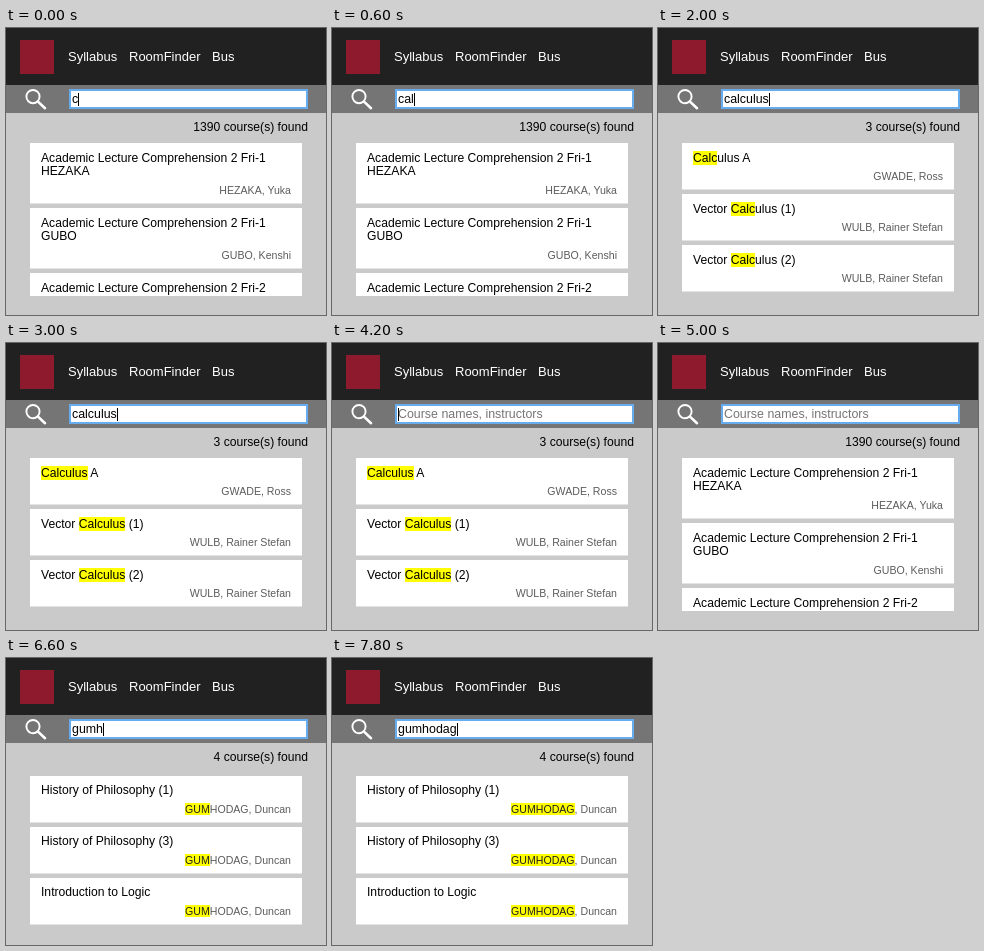
Write an HTML page that moves like this. It is 320x287 px and loops after 8 s.

```html
<!DOCTYPE html>
<html lang="en">
<head>
<meta charset="utf-8">
<title>Course search</title>
<style>
  html, body { margin: 0; width: 100%; height: 100%; overflow: hidden; }
  body { position: relative; max-width: 320px; background: #cacaca; color: #000;
         font: 12.15px/14px "Liberation Sans", Arial, sans-serif; }
  body div, body span, svg { position: absolute; white-space: pre; }
  .top { left: 0; top: 0; width: 320px; height: 57px; background: #212121; }
  .top span { top: 22px; color: #fff; font-size: 13px; }
  .logo { left: 14px; top: 12px; width: 34px; height: 34px; background: #8e1a2e; }
  .bar { left: 0; top: 57px; width: 320px; height: 28px; background: #757575; }
  .field { left: 64px; top: 62px; width: 237px; height: 18px; background: #fff;
           box-shadow: inset 0 0 0 1px #66acef, 0 0 0 1px #66acef; }
  #query { left: 2px; top: 2px; font-size: 12.4px; }
  #query.empty { color: #757575; }
  #caret { top: 3px; width: 1px; height: 13px; background: #000; }
  #count { right: 18px; top: 92px; }
  #list { left: 24px; top: 0; width: 272px; height: 268px; overflow: hidden; }
  .card { left: 0; width: 272px; background: #fff; box-shadow: inset 0 -1px #e4e4e4; }
  .card .title { left: 11px; line-height: 13px; }
  .card .who { right: 11px; color: #5c5c5c; font-size: 10.6px; line-height: 12px; }
  mark { background: #ff0; color: inherit; }
  .who mark { color: #222; }
</style>
</head>
<body>
  <div class="top">
    <div class="logo"></div>
    <span style="left:62px">Syllabus</span>
    <span style="left:123px">RoomFinder</span>
    <span style="left:206px">Bus</span>
  </div>
  <div class="bar"></div>
  <svg style="left:0;top:57px" width="60" height="28" fill="none" stroke="#fff">
    <circle cx="27" cy="11.6" r="6.6" stroke-width="1.9"/>
    <path d="M32 16.6L39 23.2" stroke-width="2.6" stroke-linecap="round"/>
  </svg>
  <div class="field"><span id="query"></span><div id="caret"></div></div>
  <span id="count"></span>
  <div id="list"></div>

<script>
const LOOP = 8000;
const $ = id => document.getElementById(id);
const lecture = 'Academic Lecture Comprehension 2 Fri-';

const results = {
  all: {
    count: 1390, top: 115, height: 61, pad: 9,
    rows: [
      [lecture + '1\nHEZAKA', 'HEZAKA, Yuka'],
      [lecture + '1\nGUBO', 'GUBO, Kenshi'],
      [lecture + '2\nBEZONHALNE', '']
    ]
  },
  calculus: {
    count: 3, top: 115, height: 47, pad: 9,
    rows: [
      ['Calculus A', 'GWADE, Ross'],
      ['Vector Calculus (1)', 'WULB, Rainer Stefan'],
      ['Vector Calculus (2)', 'WULB, Rainer Stefan']
    ]
  },
  teacher: {
    count: 4, top: 118, height: 47, pad: 8,
    rows: ['History of Philosophy (1)', 'History of Philosophy (3)', 'Introduction to Logic']
      .map(title => [title, 'GUMHODAG, Duncan'])
  }
};

// start time, typed text, result set, highlighted term, caret shown
const steps = [
  [0, 'c', 'all', '', 1],
  [200, 'ca', 'all', '', 1],
  [600, 'cal', 'all', '', 1],
  [800, 'calc', 'all', '', 1],
  [1000, 'calc', 'calculus', 'calc', 1],
  [1200, 'calcu', 'calculus', 'calc', 1],
  [1600, 'calcul', 'calculus', 'calc', 1],
  [1800, 'calculu', 'calculus', 'calc', 1],
  [2000, 'calculus', 'calculus', 'calc', 1],
  [2400, 'calculus', 'calculus', 'calculus', 1],
  [2600, 'calculus', 'calculus', 'calculus', 0],
  [3000, 'calculus', 'calculus', 'calculus', 1],
  [3200, 'calculu', 'calculus', 'calculus', 1],
  [3400, 'calcul', 'calculus', 'calculus', 1],
  [3600, 'calc', 'calculus', 'calculus', 1],
  [3800, 'cal', 'calculus', 'calculus', 1],
  [4000, 'c', 'calculus', 'calculus', 1],
  [4200, '', 'calculus', 'calculus', 1],
  [4600, '', 'all', '', 1],
  [5000, '', 'all', '', 0],
  [5600, 'g', 'all', '', 1],
  [6000, 'gu', 'all', '', 1],
  [6200, 'gum', 'all', '', 1],
  [6600, 'gumh', 'teacher', 'gum', 1],
  [6800, 'gumho', 'teacher', 'gum', 1],
  [7200, 'gumhod', 'teacher', 'gumh', 1],
  [7400, 'gumhoda', 'teacher', 'gumho', 1],
  [7600, 'gumhodag', 'teacher', 'gumho', 1],
  [7800, 'gumhodag', 'teacher', 'gumhodag', 1]
];

const highlight = (text, term) =>
  term ? text.replace(new RegExp(term, 'i'), '<mark>$&</mark>') : text;

function card([title, who], i, { top, height, pad }, term) {
  const y = top + i * (height + 4);
  return `<div class="card" style="top:${y}px;height:${height}px">` +
    `<span class="title" style="top:${pad}px">${highlight(title, term)}</span>` +
    `<span class="who" style="top:${height - 20}px">${highlight(who, term)}</span></div>`;
}

let shown;
function draw(time) {
  const step = steps.filter(s => s[0] <= time).pop();
  if (step === shown) return;
  shown = step;
  const [, text, key, term, caret] = step;
  const set = results[key];
  const query = $('query');
  query.textContent = text || 'Course names, instructors';
  query.className = text ? '' : 'empty';
  $('caret').style.left = (text ? 2 + query.offsetWidth : 2) + 'px';
  $('caret').style.opacity = caret;
  $('count').textContent = set.count + ' course(s) found';
  $('list').innerHTML = set.rows.map((row, i) => card(row, i, set, term)).join('');
}

function tick(now) {
  draw(now % LOOP);
  requestAnimationFrame(tick);
}
draw(0);
requestAnimationFrame(tick);
</script>
</body>
</html>
```
